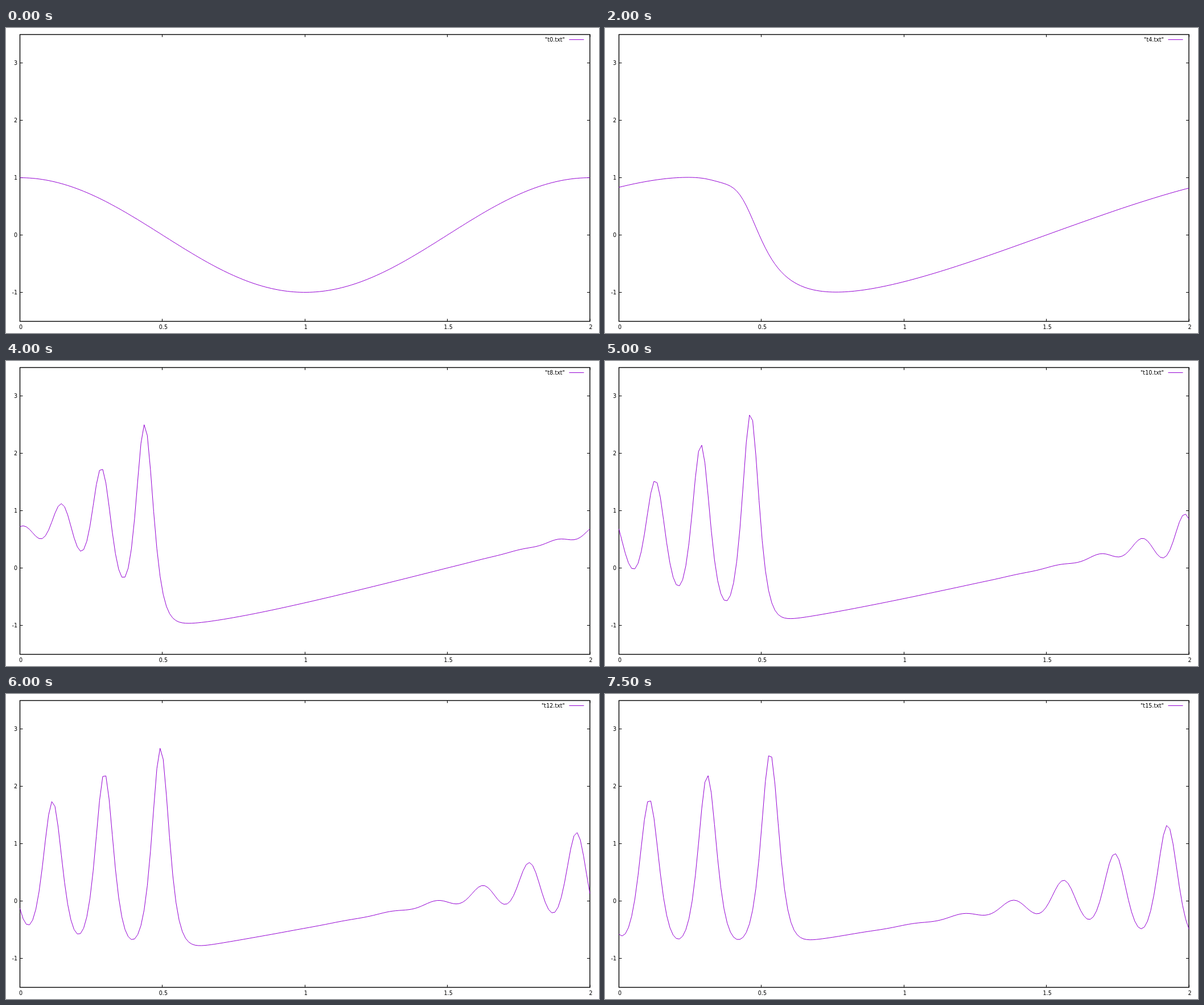
An HTML page with a canvas that plays this animation: 1042x537 px, repeating every 8 s.

```html
<!DOCTYPE html>
<html lang="en">
<head>
<meta charset="utf-8">
<title>Wave plot</title>
<style>
html, body { margin: 0; width: 100%; height: 100%; overflow: hidden; background: #fff; }
canvas { display: block; }
</style>
</head>
<body>
<canvas id="plot" width="1042" height="537"></canvas>
<script>
const ctx = document.getElementById('plot').getContext('2d');
const LEFT = 24.5, RIGHT = 1026, TOP = 11.5, BOTTOM = 516.5;
const N = 180, DX = 2 / (N - 1), DELTA2 = 0.022 ** 2;
const DT = 0.001, STEPS = 60, STEP_MS = 500, STATES = 16, LAST = 14;

const px = x => LEFT + x * (RIGHT - LEFT) / 2;
const py = y => 364.5 - y * 100.9;

// Korteweg-de Vries equation on a periodic grid: u_t = -u u_x - d^2 u_xxx
function slope(u) {
  return u.map((v, i) => {
    const a = u[(i + N - 2) % N], b = u[(i + N - 1) % N];
    const c = u[(i + 1) % N], d = u[(i + 2) % N];
    return -(b + v + c) * (c - b) / (6 * DX)
      - DELTA2 * (d - 2 * c + 2 * b - a) / (2 * DX ** 3);
  });
}

function advance(u) {
  const add = (k, h) => u.map((v, i) => v + h * k[i]);
  const k1 = slope(u);
  const k2 = slope(add(k1, DT / 2));
  const k3 = slope(add(k2, DT / 2));
  const k4 = slope(add(k3, DT));
  return u.map((v, i) => v + DT / 6 * (k1[i] + 2 * k2[i] + 2 * k3[i] + k4[i]));
}

function solve() {
  let u = Float64Array.from({ length: N }, (_, i) => Math.cos(Math.PI * i * DX));
  const waves = [u];
  while (waves.length <= LAST) {
    for (let s = 0; s < STEPS; s++) u = advance(u);
    waves.push(u);
  }
  return waves;
}

function line(points, color, width = 1) {
  ctx.strokeStyle = color;
  ctx.lineWidth = width;
  ctx.beginPath();
  points.forEach(([x, y]) => ctx.lineTo(x, y));
  ctx.stroke();
}

function label(text, x, y, align) {
  ctx.textAlign = align;
  ctx.fillText(text, x, y);
}

function drawAxes() {
  ctx.fillStyle = '#000';
  ctx.font = '9.6px "DejaVu Sans", sans-serif';
  for (let v = -1; v <= 3; v++) {
    const y = Math.floor(py(v)) + 0.5;
    line([[LEFT, y], [LEFT + 5, y]], '#000');
    line([[RIGHT, y], [RIGHT - 5, y]], '#000');
    label(v, 20, y + 3.5, 'right');
  }
  for (let v = 0; v <= 2; v += 0.5) {
    const x = Math.floor(px(v)) + 0.5;
    line([[x, TOP], [x, TOP + 4.5]], '#000');
    line([[x, BOTTOM], [x, BOTTOM - 4.5]], '#000');
    label(v, px(v) + 1.5, 530, 'center');
  }
  ctx.strokeStyle = '#000';
  ctx.lineWidth = 1.4;
  ctx.strokeRect(LEFT, TOP, RIGHT - LEFT, BOTTOM - TOP);
}

const waves = solve();
let shown = -1;

function draw(state) {
  ctx.fillStyle = '#fff';
  ctx.fillRect(0, 0, 1042, 537);
  drawAxes();
  label(`"t${state}.txt"`, 982, 24, 'right');
  line([[989.5, 20.5], [1015.5, 20.5]], '#9400d3');
  const wave = waves[Math.min(state, LAST)];
  line(Array.from(wave, (v, i) => [px(i * DX), py(v)]), '#9400d3');
}

function tick() {
  const state = Math.floor(performance.now() / STEP_MS) % STATES;
  if (state !== shown) draw(shown = state);
  requestAnimationFrame(tick);
}
tick();
</script>
</body>
</html>
```
